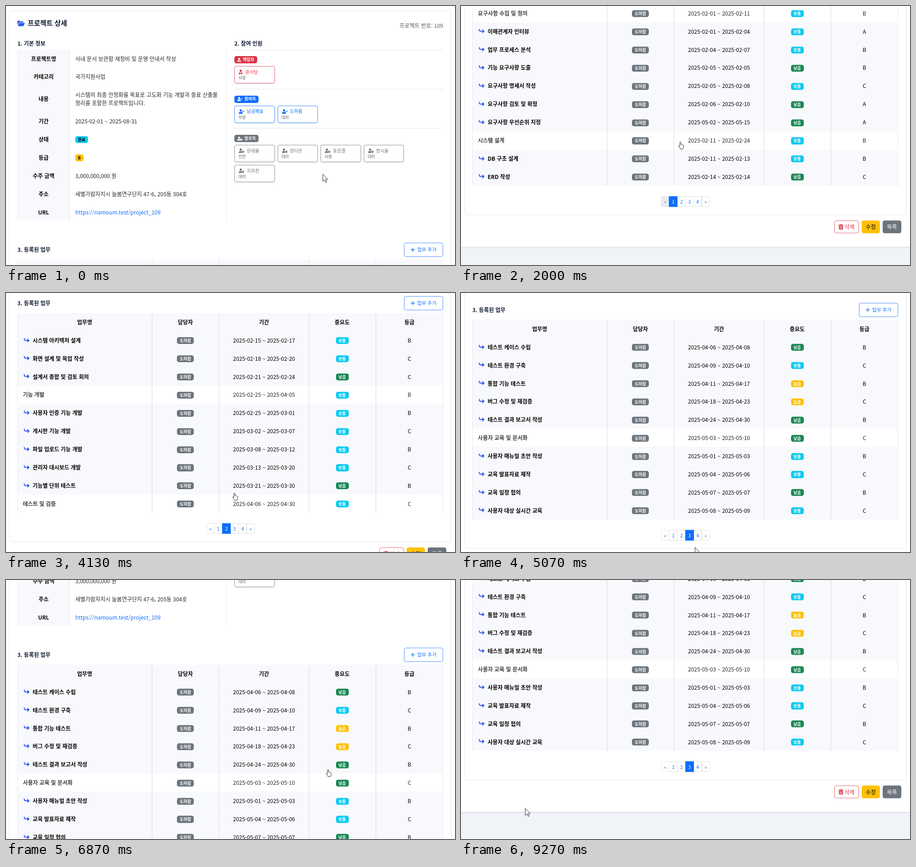
An HTML page that plays this animation: 985 by 569 pixels, repeating every 9340 ms.

```html
<!DOCTYPE html>
<html lang="ko">
<head>
<meta charset="utf-8">
<style>
html, body { margin: 0; width: 100%; height: 100%; overflow: hidden; background: #fff; }
#stage { position: relative; width: 985px; height: 569px; overflow: hidden; background: #f0f4f9;
  font: 11.94px 'Noto Sans CJK KR', 'Noto Sans KR', 'Noto Sans', sans-serif; color: #212529; }
#page { position: absolute; left: 0; top: 0; width: 985px; height: 1190px; }
#stage div, #stage svg { position: absolute; box-sizing: border-box; }
#stage svg { overflow: visible; }
.t { white-space: nowrap; line-height: 18px; }
.b { font-weight: 700; }
.m { -webkit-text-stroke: .3px; }
.badge { border-radius: 4.5px; height: 15.2px; line-height: 15.6px; font-size: 8.96px; font-weight: 700; text-align: center; white-space: nowrap; }
.btn { border-radius: 4.5px; text-align: center; white-space: nowrap; }
.person { border-radius: 4.5px; width: 88.6px; height: 38.2px; background: #fff; box-shadow: 0 1.5px 3px rgba(0,0,0,.08); }
</style>
</head>
<body>
<div id="stage">
  <div id="page"></div>
  <svg id="cursor" width="12" height="20" fill="#fff" stroke="#111" stroke-width=".9" stroke-linejoin="round">
    <path id="arrow" d="M.5 .5V16.2L4.2 12.7 6.6 18.5 9 17.5 6.6 11.8H11.4Z"/>
    <path id="hand" d="M-1.2 9.5V1.2Q-1.2 0 0 0T1.2 1.2V5.6Q2.6 4.8 3.3 6 4.6 5.4 5.2 6.7 6.8 6.4 6.8 8V11Q6.8 14 5.2 15.8H.2Q-.8 13.4-3.2 10.9-4.3 9.4-3.5 8.6-2.6 8-1.2 9.5Z"/>
  </svg>
</div>
<script>
const LOOP = 9340;
const BLUE = '#0d6efd', RED = '#dc3545', GRAY = '#6c757d', CYAN = '#0dcaf0', GREEN = '#198754', YELLOW = '#ffc107';
const LINE = '#dee2e6', PALE = '#f8f9fc', NAVY = '#111a33';
const $ = id => document.getElementById(id);

const box = (x, y, w, h, css = '', html = '', cls = '') =>
  `<div class="${cls}" style="left:${x}px;top:${y}px;width:${w}px;height:${h}px;${css}">${html}</div>`;
const text = (x, y, s, css = '', cls = '') =>
  `<div class="t ${cls}" style="left:${x}px;top:${y - 9}px;${css}">${s}</div>`;
const mid = (x, y, s, css = '', cls = '') =>
  text(x - 150, y, s, 'width:300px;text-align:center;' + css, cls);
const badge = (x, y, w, s, bg, color = '#fff') =>
  `<div class="badge" style="left:${x}px;top:${y - 7.6}px;width:${w}px;background:${bg};color:${color}">${s}</div>`;
const svg = (x, y, body, color, scale = 1) =>
  `<svg width="16" height="16" style="left:${x}px;top:${y}px;transform:scale(${scale});transform-origin:0 0" fill="${color}">${body}</svg>`;

const extras = {
  tie: (c, bg) => `<path fill="${bg}" d="M4.2 6h1.6l-.4 1 .6 2.4-1 .6-1-.6.6-2.4z"/>`,
  check: c => `<path fill="none" stroke="${c}" stroke-width="1.3" d="M8.7 4.2l1.5 1.5 2.8-3"/>`,
  clock: (c, bg) => `<circle cx="10.3" cy="7.4" r="3" stroke="${bg}" stroke-width=".8"/><path fill="none" stroke="${bg}" stroke-width=".7" d="M10.3 5.8v1.7h1.2"/>`
};
const user = (kind, x, y, color, bg, scale) => svg(x, y,
  '<circle cx="5" cy="2.6" r="2.5"/><path d="M.4 10Q.4 6 4 6H6Q9.6 6 9.6 10Z"/>' + extras[kind](color, bg), color, scale);

function infoTable() {
  const rows = [
    ['프로젝트명', '사내 문서 보관함 재정비 및 운영 안내서 작성'],
    ['카테고리', '국가지원사업'],
    ['내용', '시스템의 최종 안정화를 목표로 고도화 기능 개발과 종료 산출물<br>정리를 포함한 프로젝트입니다.'],
    ['기간', '2025-02-01 ~ 2025-08-31'],
    ['상태', ''], ['등급', ''],
    ['수주 금액', '3,000,000,000 원'],
    ['주소', '새별가람자치시 늘봄연구단지 47-6, 205동 304호'],
    ['URL', `<span style="color:${BLUE}">https://namoum.test/project_109</span>`]
  ];
  let y = 95.6;
  let out = box(25, 96, 115, 376, `background:${PALE};border-left:1px solid #e9ecf0;border-right:1px solid ${LINE}`)
    + box(483, 96, 1, 376, 'background:#e6e9ed');
  rows.forEach(([label, value], i) => {
    const h = i === 2 ? 57.8 : 39.9, c = y + h / 2;
    out += mid(82.5, c, label, 'color:#000', 'b') + text(152, i === 2 ? c - 9 : c, value);
    if (i === 4) out += badge(152, c + .6, 28.2, '완료', CYAN, '#000');
    if (i === 5) out += badge(152, c + .6, 17.8, 'B', YELLOW, '#000');
    y += h;
  });
  return out;
}

function people() {
  const groups = [
    ['책임자', 'tie', RED, 110, 49.5, ['윤서담 사장']],
    ['참여자', 'check', BLUE, 196.5, 53, ['남궁해솔 부장', '도하람 대리']],
    ['참조자', 'clock', GRAY, 283, 53, ['문태율 인턴', '양다온 대리', '표은결 사원', '방시율 대리', '지우찬 대리']]
  ];
  let out = '';
  groups.forEach(([role, kind, color, y, w, list], g) => {
    out += box(501, [96, 181.5, 268][g], 458, 1, 'background:#e3e6ea')
      + box(501, y, w, 16, `background:${color};border-radius:4.5px`)
      + user(kind, 506.5, y + 3.6, '#fff', color, .88)
      + text(g ? 523 : 519.5, y + 7.8, role, 'font-size:8.96px;color:#fff', 'b');
    list.forEach((entry, i) => {
      const [name, rank] = entry.split(' ');
      const x = 501 + i % 4 * 94.5, top = y + 22 + (i > 3 ? 44 : 0);
      out += `<div class="person" style="left:${x}px;top:${top}px;border:1px solid ${color}c0"></div>`
        + user(kind, x + 9.3, top + 8, color, '#fff', .97)
        + text(x + (g ? 27.3 : 24), top + 12.6, name, `font-size:9.95px;color:${color}`)
        + text(x + 9, top + 26, rank, 'font-size:8.7px;color:#555b62');
    });
  });
  return out;
}

const SHEETS = [
  `*요구사항 수집 및 정의|02-01|02-11|보통|B
이해관계자 인터뷰|02-01|02-04|보통|A
업무 프로세스 분석|02-04|02-07|보통|B
기능 요구사항 도출|02-05|02-05|낮음|B
요구사항 명세서 작성|02-05|02-08|보통|C
요구사항 검토 및 확정|02-06|02-10|낮음|A
요구사항 우선순위 지정|05-02|05-15|낮음|A
*시스템 설계|02-11|02-24|보통|B
DB 구조 설계|02-11|02-13|보통|B
ERD 작성|02-14|02-14|낮음|C`,
  `시스템 아키텍처 설계|02-15|02-17|보통|B
화면 설계 및 목업 작성|02-18|02-20|보통|C
설계서 종합 및 검토 회의|02-21|02-24|낮음|C
*기능 개발|02-25|04-05|보통|B
사용자 인증 기능 개발|02-25|03-01|보통|B
게시판 기능 개발|03-02|03-07|보통|C
파일 업로드 기능 개발|03-08|03-12|보통|B
관리자 대시보드 개발|03-13|03-20|보통|C
기능별 단위 테스트|03-21|03-30|낮음|B
*테스트 및 검증|04-06|04-30|보통|C`,
  `테스트 케이스 수립|04-06|04-08|낮음|B
테스트 환경 구축|04-09|04-10|보통|C
통합 기능 테스트|04-11|04-17|높음|B
버그 수정 및 재검증|04-18|04-23|높음|C
테스트 결과 보고서 작성|04-24|04-30|낮음|B
*사용자 교육 및 문서화|05-03|05-10|낮음|C
사용자 매뉴얼 초안 작성|05-01|05-03|보통|B
교육 발표자료 제작|05-04|05-06|보통|C
교육 일정 협의|05-07|05-07|낮음|B
사용자 대상 실시간 교육|05-08|05-09|보통|C`
];
const LEVELS = { 보통: CYAN, 낮음: GREEN, 높음: YELLOW };
const COLS = [172.5, 393.5, 566, 737.5, 885];
const ROW = 39.88, TOP = 557, FIRST = TOP + ROW, END = FIRST + ROW * 10;

function pager(active) {
  const edges = [439, 456.3, 474.2, 492, 509.8, 527.5, 545];
  let out = '';
  ['«', 1, 2, 3, 4, '»'].forEach((label, i) => {
    const on = i === active, off = !i && active === 1;
    const bg = on ? BLUE : off ? '#e9ecef' : '#fff';
    out += box(edges[i], 1019, edges[i + 1] - edges[i] + 1, 23,
        `background:${bg};border:1px solid ${on ? BLUE : LINE};${on ? 'z-index:1;' : ''}border-radius:${i ? 0 : 4}px ${i === 5 ? '4px 4px' : '0 0'} ${i ? 0 : 4}px`,
        `<div class="t" style="left:0;right:0;top:1.5px;text-align:center;font-size:10.45px;color:${on ? '#fff' : off ? GRAY : BLUE}">${label}</div>`);
  });
  return out;
}

function sheet(data, n) {
  let out = '';
  data.split('\n').forEach((line, i) => {
    const [name, from, to, level, grade] = line.split('|');
    const y = FIRST + ROW * i, c = y + ROW / 2, parent = name[0] === '*';
    const color = parent ? 'color:#212529' : 'color:#000';
    if (!parent) {
      out += box(25, y, 934, ROW + .1, `background:${PALE}`)
        + svg(38.5, c - 5.3, '<path fill="none" stroke="#2f55f0" stroke-width="1.9" stroke-linejoin="round" stroke-linecap="round" d="M1.2 1V2.6Q1.2 5.3 4 5.3H11M8.2 2.3L11.4 5.3 8.2 8.3"/>', 'none');
    }
    out += parent ? text(37, c, name.slice(1), color, 'm') : text(58.5, c, name, color, 'b');
    out += badge(375.4, c + 1, 36.3, '도하람', GRAY)
      + mid(COLS[2], c, `2025-${from} ~ 2025-${to}`, color)
      + badge(723.5, c + 1, 28.2, level, LEVELS[level])
      + mid(COLS[4], c, grade, color);
  });
  const lines = [25, 319.6, 467, 663.6, 811, 958.4].map((x, i) =>
    box(x, TOP, 1, END - TOP, `background:${i % 5 ? '#d6dbe1' : '#e6e9ed'}`)).join('');
  return `<div class="sheet" style="left:0;top:0;width:985px;height:0">${out}${lines}${pager(n + 1)}</div>`;
}

function build() {
  const heads = ['업무명', '담당자', '기간', '중요도', '등급'];
  const addIcon = '<path d="M4 0h1.4v4H9.4v1.4H5.4v4H4v-4H0V4h4z"/>';
  const bin = `<path d="M0 1.3H3.2L4 .2H7L7.8 1.3H11V2.8H0zM.8 3.6H10.2L9.6 11.8H1.4z"/><path stroke="#fff" stroke-width=".8" d="M3.5 5v5.4M5.5 5v5.4M7.5 5v5.4"/>`;
  const button = (x, y, w, h, css, s) => box(x, y, w, h, `line-height:${h}px;${css}`, s, 'btn');
  $('page').innerHTML =
    box(0, -10, 985, 1139.5, 'background:#fff;box-shadow:0 1.5px 3px rgba(0,0,0,.12)')
    + box(7, 10, 970, 1050, 'border:1px solid #e4e7ec;border-radius:6px')
    + svg(25, 31.5, '<path d="M0 10.2V1.5Q0 .3 1.2 .3H5L6.8 2H12.2Q13.4 2 13.4 3.2V4.3H4.6Q3.4 4.3 2.9 5.3Z"/><path d="M.6 12.3L3.6 6.2Q4 5.3 4.9 5.3H16.6L13.6 11.4Q13.1 12.3 12.2 12.3Z"/>', '#2b59ee')
    + text(47.5, 37.2, '프로젝트 상세', `font-size:14.93px;color:${NAVY}`, 'b')
    + text(759, 43, '프로젝트 번호: 109', 'width:200px;text-align:right;color:#555b62')
    + text(25, 82, '1. 기본 정보', `color:${NAVY}`, 'b')
    + text(501, 82, '2. 참여 인원', `color:${NAVY}`, 'b')
    + infoTable() + people()
    + text(25, 535, '3. 등록된 업무', `color:${NAVY}`, 'b')
    + button(872.5, 519.5, 86.5, 31.5, `border:1px solid ${BLUE}c0`, '')
    + svg(887.6, 530.6, addIcon, BLUE, .95)
    + text(902, 535, '업무 추가', `font-size:10.75px;color:${BLUE}`)
    + box(25, TOP, 934, ROW, `background:${PALE}`)
    + heads.map((s, i) => mid(COLS[i], TOP + ROW / 2, s, 'color:#000', 'b')).join('')
    + SHEETS.map(sheet).join('')
    + button(818.5, 1072, 54.5, 28, `border:1px solid ${RED}c0`, '')
    + svg(827.6, 1080, bin, RED)
    + text(841.5, 1085.8, '삭제', `color:${RED}`)
    + button(879, 1072, 40, 28, `background:${YELLOW};color:#000`, '수정')
    + button(925, 1072, 40.5, 28, `background:${GRAY};color:#fff`, '목록');
}

// [time, scroll]
const SCROLL = [[150, 0], [1000, 330.5], [1330, 330.5], [2128, 620.5], [3060, 620.5], [3470, 547],
  [3850, 545], [4300, 498.3], [5130, 498.3], [5700, 620.5], [5900, 620.5], [7130, 339.1], [7220, 339.1], [8130, 620.5]];
// [time, x, y]
const MOUSE = [[20, 694.5, 369], [1000, 441, 295], [1130, 438.5, 299], [1200, 438.5, 299], [1330, 436.5, 301.5],
  [2000, 481.3, 298.5], [2240, 508, 371], [2730, 486, 410], [2930, 486, 410], [3470, 501, 410], [3850, 501, 410],
  [4730, 502, 533], [4850, 502, 533], [5070, 513, 558.5], [5300, 530, 590], [5700, 600, 590], [6600, 706.5, 416.3],
  [7220, 706.5, 416.3], [8200, 312, 462], [8270, 310, 464], [8530, 40, 552], [8730, 92, 543], [9140, 92, 543], [9270, 140.5, 501]];

function at(keys, t) {
  const i = keys.findIndex(k => k[0] > t);
  if (i < 0) return keys[keys.length - 1].slice(1);
  if (!i) return keys[0].slice(1);
  const a = keys[i - 1], b = keys[i];
  const u = (t - a[0]) / (b[0] - a[0]), e = u * u * (3 - 2 * u);
  return a.slice(1).map((v, j) => v + (b[j + 1] - v) * e);
}

build();
const sheets = [...document.querySelectorAll('.sheet')];

function draw(now) {
  const t = now % LOOP;
  const [scroll] = at(SCROLL, t), [x, y] = at(MOUSE, t);
  const current = t < 2925 ? 0 : t < 4865 ? 1 : 2;
  sheets.forEach((el, i) => el.style.display = i === current ? '' : 'none');
  $('page').style.transform = `translateY(${-scroll}px)`;
  const py = y + scroll;
  const link = (py > FIRST && py < END && x > 25 && x < 959) || (py > 1019 && py < 1042 && x > 439 && x < 545);
  $('hand').style.display = link ? '' : 'none';
  $('arrow').style.display = link ? 'none' : '';
  $('cursor').style.transform = `translate(${x}px,${y}px)`;
}

const start = performance.now();
function tick() {
  draw(performance.now() - start);
  requestAnimationFrame(tick);
}
tick();
</script>
</body>
</html>
```
